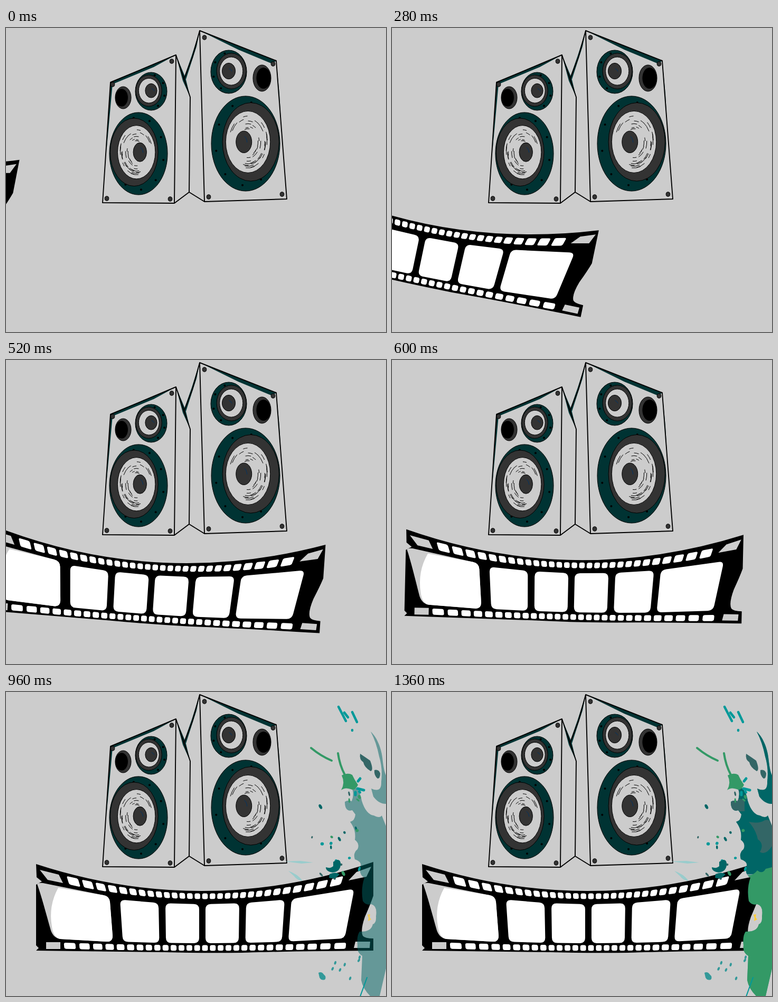
Animation of 720 by 576 pixels, one loop 1.6 s. Source, as an HTML page:

```html
<!DOCTYPE html>
<html lang="en">
<head>
<meta charset="utf-8">
<title>Speakers, film and paint</title>
<style>
html, body { margin: 0; width: 100%; height: 100%; overflow: hidden; background: #ccc; }
svg { display: block; width: 100%; height: 100%; }
</style>
</head>
<body>
<svg id="stage" viewBox="0 0 720 576"></svg>
<script>
const LOOP = 1600, STEP = 40, LAND = 640;
const BG = '#ccc', DEEP = '#033', DARK = '#333', PINE = '#066', GREEN = '#396', TEAL = '#099', SLATE = '#366';

const path = (d, fill) => `<path d="${d}" fill="${fill}"/>`;
const line = (d, w, color = '#000') =>
  `<path d="${d}" fill="none" stroke="${color}" stroke-width="${w}" stroke-linejoin="round" stroke-linecap="round"/>`;
const oval = (x, y, rx, ry, fill, turn = 0) =>
  `<ellipse cx="${x}" cy="${y}" rx="${rx}" ry="${ry}" fill="${fill}" transform="rotate(${turn} ${x} ${y})"/>`;
const inked = (x, y, rx, ry, fill) => `<ellipse cx="${x}" cy="${y}" rx="${rx}" ry="${ry}" fill="${fill}" stroke="#000"/>`;
const repeat = (n, draw) => Array.from({ length: n }, (_, i) => draw(i)).join('');

function random(seed) {
  return () => (seed = (seed * 16807) % 2147483647) / 2147483647;
}

// Closed polygon with rounded corners
function rounded(pts, r) {
  const toward = (a, b) => {
    const k = Math.min(.45, r / Math.hypot(b[0] - a[0], b[1] - a[1]));
    return [a[0] + (b[0] - a[0]) * k, a[1] + (b[1] - a[1]) * k];
  };
  return pts.map((p, i) => {
    const from = toward(p, pts[(i + pts.length - 1) % pts.length]);
    const to = toward(p, pts[(i + 1) % pts.length]);
    return `${i ? 'L' : 'M'}${from} Q${p} ${to}`;
  }).join('') + 'Z';
}

// Short pen strokes circling a cone
function scribble(x, y, rx, ry, side, count) {
  const rnd = random(41);
  const point = (k, a) => [x + side * rx * k * Math.cos(a), y + ry * k * Math.sin(a)];
  return line(repeat(count, i => {
    const k = .45 + .47 * rnd(), a = (i % 3 ? -.6 : 3.5) + 2.2 * rnd(), b = a + .15 + .35 * rnd();
    return `M${point(k, a)}A${rx * k},${ry * k} 0 0 ${side > 0 ? 1 : 0} ${point(k, b)}`;
  }), 1);
}

// Nested ellipses; side is the way the inner ones lean
function driver(x, y, rx, ry, side, { cone, cap, bolts, from, step, strokes }) {
  const layer = (shift, scale, fill) => inked(x + side * shift * rx, y - .035 * ry, rx * scale, ry * scale, fill);
  const bolt = i => {
    const a = (from + step * i) * Math.PI / 180;
    return oval(x - side * .87 * rx * Math.cos(a), y + .88 * ry * Math.sin(a), 2, 2, '#000');
  };
  return inked(x, y, rx, ry, DEEP) + repeat(bolts, bolt) +
    layer(.15, .825, DARK) + layer(cone, .65, BG) +
    scribble(x + side * cone * rx, y - .035 * ry, rx * .62, ry * .62, side, strokes) +
    layer(-cap, strokes ? .23 : .37, DARK) +
    line(`M${x - side * cap * rx + 1},${y - ry * .15}q4,2 5,${ry * .12}`, 1, '#036');
}
const WOOFER = { cone: .07, cap: .05, bolts: 7, from: -101, step: 37, strokes: 42 };
const TWEETER = { cone: .14, cap: 0, bolts: 4, from: -75, step: 45, strokes: 0 };

const port = (x, y, rx, ry, side) => inked(x, y, rx, ry, DARK) + oval(x + side * 3, y, rx * .8, ry * .8, '#000');
const screws = list => list.map(([x, y]) => inked(x, y, 3.8, 4.2, DARK)).join('');

function speakers() {
  return path('M198,102L322,51 280,74 203,106ZM322,51L340,94 349,131 335,100ZM198,103L202,105 190,237Z', DEEP) +
    path('M367,5L512,62 505,68 440,41ZM367,5L361,35 341,97 337,95 352,52ZM512,62L518,125 523,212Z', DEEP) +
    line('M198,103L322,51 319,332 183,331ZM322,51L349,131 347,311 319,332', 1.9) +
    line('M367,5L512,62 532,324 376,329ZM367,5L353,56 337,97M347,311L376,329', 1.9) +
    screws([[202, 107], [314, 63], [191, 323], [311, 324], [376, 18], [506, 68], [384, 320], [523, 315]]) +
    port(222, 132, 15, 21, -1) + driver(275, 120, 30, 36, -1, TWEETER) + driver(251, 238, 55, 78, -1, WOOFER) +
    port(485, 95, 17, 25, 1) + driver(422, 83, 34, 41, 1, TWEETER) + driver(454, 219, 65, 90, 1, WOOFER);
}

// Sprocket holes widen, rise and lean towards both ends of the strip
function holes(y, pitch, bend, lean, grow) {
  const at = i => pitch * i + .00075 * Math.abs(i) ** 4.2 * Math.sign(i);
  return repeat(29, n => {
    const i = n - 14, off = at(i), w = (at(i + .5) - at(i - .5)) * .37, h = 5.4 + grow * (off / 250) ** 2;
    const corner = (dx, dy) => [377 + off + dx - lean * off * dy / h, y - bend * off * off + dy - 2 * bend * off * dx];
    return path(rounded([corner(-w, -h), corner(w, -h), corner(w, h), corner(-w, h)], 3.5), '#fff');
  });
}

// One picture window between two distances from the middle of the strip
function frame(side, near, far) {
  const top = d => [372 + side * d, 402 - .00035 * d * d];
  const foot = d => [372 + side * (d - .00022 * d * d), 476 - .00011 * d * d];
  return path(rounded([top(near), top(far), foot(far), foot(near)], 10), '#fff');
}

function film() {
  const end = 'L185,385Q196,387 197,398L202,462Q202,474 190,473L103,468Q90,466 ';
  return path('M57,326Q376,430 696,322V386Q691,401 680,426Q671,452 676,462Q680,467 696,467V490Q540,491 448,494Q370,495 300,493L57,490 62,485 57,480V365L68,359 58,351Z', '#000') +
    path(`M59,364Q62,361 70,362${end}85,452C76,420 67,386 59,364Z`, BG) +
    path(`M99,371${end}87,445Q80,405 99,371Z`, '#fff') +
    [-1, 1].map(s => frame(s, 6, 70) + frame(s, 83, 156)).join('') + frame(1, 169, 288) +
    holes(387, 14.3, .00045, .01, 2.6) + holes(485, 14.8, .00006, .002, .4) +
    path('M64,337L100,346 108,362 79,356ZM664,341L692,331 683,350 649,357Z', BG) +
    path('M76,474H103V487H76ZM662,473H690L689,485H659Z', BG);
}

const BODY = 'M691,75C701,84 712,104 714,132Q716,150 720,158V212Q706,212 696,198L692,183Q712,192 711,170Q714,145 707,122Q702,96 691,75Z' +
  'M660,180Q671,186 674,206Q682,232 697,234Q708,240 712,234L720,254V524L708,576H690Q676,562 673,546L675,500Q664,494 666,480Q664,462 670,454Q692,455 695,440Q702,438 701,425Q704,405 692,402Q682,405 676,396Q672,372 679,352Q669,346 671,333Q676,322 661,317Q657,305 666,298Q671,288 661,280Q664,262 652,246Q661,244 662,232L656,224Q642,228 642,208Q648,204 655,207Q660,194 656,184Z';

function specks() {
  const rnd = random(23), colors = [TEAL, GREEN, SLATE, PINE];
  // Small drops, denser towards the splash
  const drop = i => {
    const x = 670 - 100 * rnd() ** 1.6, y = 185 + 170 * rnd();
    return oval(x, y, 1.5 + 2 * rnd(), 2 + 3 * rnd(), colors[i % 4], -60 + 80 * rnd());
  };
  const low = () => oval(615 + 55 * rnd(), 498 + 50 * rnd(), 2, 3.5, '#399', 40 * rnd());
  return repeat(22, drop) + repeat(7, low) +
    line('M630,28L644,55M641,39L648,48M656,38L665,57M656,72v1', 4.5, TEAL) +
    line('M578,106Q596,121 617,130M629,116Q632,138 642,157', 4, GREEN) +
    path('M636,158Q648,152 656,157Q660,166 667,176Q661,188 653,184Q642,180 635,186Q643,172 636,158Z', GREEN) +
    line('M667,169L671,164M666,183L678,186M662,190V195', 5, TEAL) +
    path('M671,117Q683,125 690,130Q697,148 691,150Q679,143 677,133Q669,128 671,117Z', SLATE) +
    path('M698,148Q706,146 709,154Q709,164 704,164Q697,158 698,148Z', SLATE) +
    path('M620,322Q632,313 634,324Q635,340 619,342Q606,340 606,332Q615,335 620,330Z', PINE) +
    path('M613,345Q624,340 632,345Q625,356 612,352Z', PINE) +
    path('M529,321L558,320 582,323 560,325ZM535,339Q553,345 562,358Q550,356 546,349Z', '#9cc') +
    path('M592,532Q598,529 602,535Q608,540 604,545Q597,547 594,541Z', '#399') +
    line('M684,541L671,577', 2, TEAL);
}

function paint() {
  return '<g clip-path="url(#body)">' +
    path('M620,60H720V345H620Z', PINE) +
    path('M640,203H668V226H640Z', SLATE) +
    path('M676,246Q696,250 706,243Q716,240 720,250V292Q708,310 697,303Q706,288 693,279Q690,262 676,246Z', SLATE) +
    path('M655,348Q682,352 692,338Q702,346 708,335L720,332V576H655Z', GREEN) + '</g>';
}

const stage = document.getElementById('stage');
stage.innerHTML = `<defs><clipPath id="body"><path d="${BODY}"/></clipPath></defs><rect width="720" height="576" fill="${BG}"/>` +
  speakers() + `<g id="film">${film()}</g>` +
  `<g id="splash"><path id="wash" d="${BODY}"/><g id="paint">${paint()}</g>` +
  `<g id="spark">${path('M685,422L690,421 689,427 692,431 686,434 687,428Z', '#fc3')}</g>${specks()}</g>`;
const [strip, splash, wash, coat, spark] = ['film', 'splash', 'wash', 'paint', 'spark'].map(id => document.getElementById(id));

// Linear interpolation over rows of [time, ...values]
function tween(keys, t) {
  if (t <= keys[0][0]) return keys[0].slice(1);
  const i = keys.findIndex(k => k[0] >= t);
  if (i < 0) return keys[keys.length - 1].slice(1);
  const a = keys[i - 1], b = keys[i], k = (t - a[0]) / (b[0] - a[0]);
  return a.slice(1).map((v, n) => v + (b[n + 1] - v) * k);
}

// time, centre x, centre y, angle
const SLIDE = [[0, -305, 273, 11], [280, 61, 402, 11.8], [320, 121, 424, 10.4], [LAND, 376, 408, 0]];
// time, opacity, green and blue level
const WASH = [[LAND, .12, 204], [720, .25, 204], [960, .5, 102]];

function draw(t) {
  const [x, y, turn] = tween(SLIDE, t);
  strip.setAttribute('transform', `translate(${x} ${y}) rotate(${turn}) translate(-376 -408)`);
  splash.setAttribute('visibility', t >= LAND ? 'visible' : 'hidden');
  const [alpha, level] = tween(WASH, t);
  wash.setAttribute('fill', `rgb(0,${level},${level})`);
  wash.setAttribute('fill-opacity', alpha);
  coat.setAttribute('opacity', tween([[960, 0], [1360, 1]], t)[0]);
  spark.setAttribute('opacity', tween([[LAND, .1], [1080, 1]], t)[0]);
}

const start = performance.now();
function tick(now) {
  const t = Math.max(0, now - start) % LOOP;
  draw(Math.floor(t / STEP) * STEP);
  requestAnimationFrame(tick);
}
draw(0);
requestAnimationFrame(tick);
</script>
</body>
</html>
```
